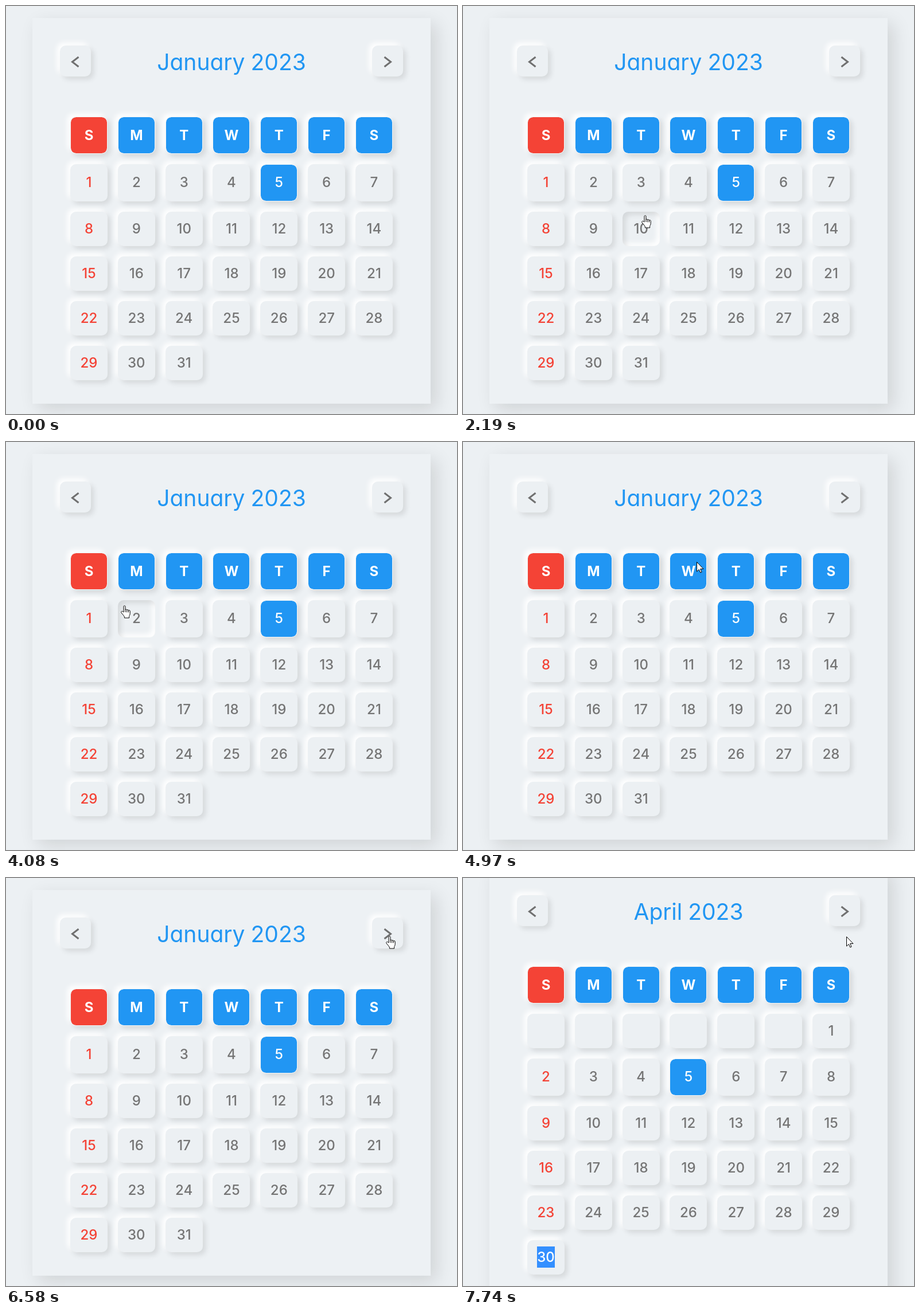
These frames come from a looping animation (786 by 712 pixels, 8 s). An HTML page:

```html
<!DOCTYPE html>
<html lang="en">
<head>
<meta charset="utf-8">
<title>Calendar</title>
<style>
  html, body { margin: 0; width: 100%; height: 100%; overflow: hidden; background: #ecf0f3; }
  body { position: relative; font-family: Inter, "Open Sans", sans-serif; font-feature-settings: "cv11"; }
  .card {
    position: absolute; left: 46px; top: 21px; width: 694px; height: 673px;
    background: #edf1f4; box-shadow: 10px 10px 30px rgba(0, 0, 0, .12);
  }
  .title {
    position: absolute; left: 0; right: 0; top: 47px; line-height: 60px;
    text-align: center; font-size: 39px; word-spacing: -1px; color: #2196f3;
  }
  .box {
    position: absolute; box-sizing: border-box; display: flex; align-items: center;
    justify-content: center; border-radius: 10px; background: #ecf0f3; color: #757575;
    font-size: 24px; font-weight: 500;
    box-shadow: 5px 5px 10px rgba(0, 0, 0, .1), -5px -5px 10px #fff;
  }
  .box.in { box-shadow: inset 5px 5px 10px rgba(0, 0, 0, .1), inset -5px -5px 10px #fff; }
  .nav { width: 54px; height: 54px; top: 48px; }
  .nav path { fill: none; stroke: #707070; stroke-width: 3; }
  .day { padding-bottom: 2px; }
  .sun { color: #f44336; }
  .fill { background: #2196f3; border: 1px solid #f2f5f7; color: #fff; background-clip: padding-box; }
  .head { font-weight: 700; }
  .head.sun { background-color: #f44336; }
  .picked { background: #338fff; color: #fff; line-height: 37px; }
  .cursor { position: absolute; left: 0; top: 0; overflow: visible; }
  .cursor path { fill: #fff; stroke: #000; stroke-width: 1; stroke-linejoin: round; }
  .cursor .lines { fill: none; }
</style>
</head>
<body>
<div class="card">
  <div class="title"></div>
  <div class="box nav" style="left:48px"><svg width="54" height="54"><path d="M32.5 20 21.5 28.5 32.5 37"/></svg></div>
  <div class="box nav" id="next" style="left:592px"><svg width="54" height="54"><path d="M21.5 20 32.5 28.5 21.5 37"/></svg></div>
  <div id="head"></div>
  <div id="days"></div>
</div>
<svg class="cursor" width="1" height="1">
  <g id="arrow"><path d="M0 0V16.5L3.8 13 6.3 18.5 8.6 17.5 6.2 12H11.5Z"/></g>
  <g id="hand" transform="translate(-6.5 -1.5)">
    <path d="M5 12V2.2C5 .2 8 .2 8 2.2V8C8 6.6 10.8 6.7 10.8 8.3C10.9 7.2 13.4 7.4 13.5 9C13.8 8.2 16.2 8.4 16.2 10.2V14.5C16.2 17 14.6 18 14.6 19.5V22H6.4V20.2C6 18.6 3.4 16 1 12.9C-.2 11 2.2 9.4 3.6 11Z"/>
    <path class="lines" d="M8 8v4M10.8 8.3v4M13.5 9v3.3"/>
  </g>
</svg>
<script>
const LOOP = 8000, LEFT = 66, PITCH = 82.83, SIZE = 65, LOW = 60, GAP = 18, TODAY = 5;
const $ = s => document.querySelector(s);
const card = $('.card'), title = $('.title'), days = $('#days'), next = $('#next');
const cursor = $('.cursor'), arrow = $('#arrow'), hand = $('#hand');

const names = ['January', 'February', 'March', 'April'];
const clicks = [6700, 6910, 7600];   // each turns to the next month
const PRESS = 90;                    // button held down before a click

// pointer moves: start, end, x, y; it rests in between
const moves = [
  [480, 850, 625, 470], [850, 1320, 470, 366], [1400, 1500, 467, 362],
  [1500, 2190, 318, 366], [2290, 2600, 305, 300], [2800, 2930, 239, 302],
  [4070, 4080, 207, 286], [4080, 4440, 206, 225], [4460, 5200, 499, 202],
  [5300, 5610, 535, 315], [5740, 5890, 591, 128], [5890, 6400, 669, 102]
];
// two loops around days 1, 2, 9 and 8
const spin = { from: 2930, to: 4080, x: 185, y: 340, rx: 72, ry: 57, a0: -42, a1: -792.5 };

const clamp = u => Math.min(1, Math.max(0, u));

function pointer(t) {
  if (t >= spin.from && t < spin.to) {
    const u = (t - spin.from) / (spin.to - spin.from);
    const a = (spin.a0 + (spin.a1 - spin.a0) * u) * Math.PI / 180;
    return [spin.x + spin.rx * Math.cos(a), spin.y + spin.ry * Math.sin(a)];
  }
  let x = 640, y = 725;
  for (const [start, end, toX, toY] of moves) {
    const u = clamp((t - start) / (end - start));
    x += (toX - x) * u;
    y += (toY - y) * u;
  }
  return [x, y];
}

function addBox(parent, col, y, h, text, kind) {
  const el = document.createElement('div'), x = LEFT + PITCH * col;
  el.className = 'box ' + kind;
  el.style.cssText = `left:${x}px;top:${y}px;width:${SIZE}px;height:${h}px`;
  el.textContent = text;
  parent.append(el);
  return { el, x, y, w: SIZE, h };
}

[...'SMTWTFS'].forEach((c, i) => addBox($('#head'), i, 172, SIZE, c, 'fill head' + (i ? '' : ' sun')));

let cells = [], shown = -1, cardTop = 21;

function showMonth(m) {
  const first = new Date(2023, m, 1).getDay(), count = new Date(2023, m + 1, 0).getDate();
  const rows = Math.ceil((first + count) / 7);
  shown = m;
  cells = [];
  days.textContent = '';
  title.textContent = names[m] + ' 2023';
  let y = 255;
  for (let r = 0; r < rows; r++) {
    const start = r * 7 - first + 1;
    const h = start <= TODAY && start + 6 >= TODAY ? SIZE : LOW;
    for (let c = 0; c < 7 && start + c <= count; c++) {
      const n = start + c, kind = n === TODAY ? ' fill' : c ? '' : ' sun';
      cells.push(addBox(days, c, y, h, n > 0 ? n : '', 'day' + kind));
    }
    y += h + GAP;
  }
  if (names[m] === 'April') cells[cells.length - 1].el.innerHTML = '<span class="picked">30</span>';
  // the card stays centred as it grows
  const extra = (rows - 5) * (LOW + GAP);
  cardTop = 21 - extra / 2;
  card.style.top = cardTop + 'px';
  card.style.height = 673 + extra + 'px';
}

const nextBox = { x: 592, y: 48, w: 54, h: 54 };
const hit = (b, x, y) => x >= b.x && x < b.x + b.w && y >= b.y && y < b.y + b.h;

function draw(t) {
  const m = clicks.filter(c => t >= c).length;
  if (m !== shown) showMonth(m);

  const [px, py] = pointer(t), x = px - 46, y = py - cardTop;
  let over = hit(nextBox, x, y);
  for (const c of cells) {
    const on = hit(c, x, y);
    c.el.classList.toggle('in', on);
    over = over || on;
  }
  next.classList.toggle('in', clicks.some(c => t >= c - PRESS && t < c));
  hand.style.display = over ? '' : 'none';
  arrow.style.display = over ? 'none' : '';
  cursor.style.transform = `translate(${Math.round(px) - .5}px, ${Math.round(py) + .5}px)`;
}

const begin = performance.now();
function tick() {
  draw((performance.now() - begin) % LOOP);
  requestAnimationFrame(tick);
}
tick();
</script>
</body>
</html>
```
